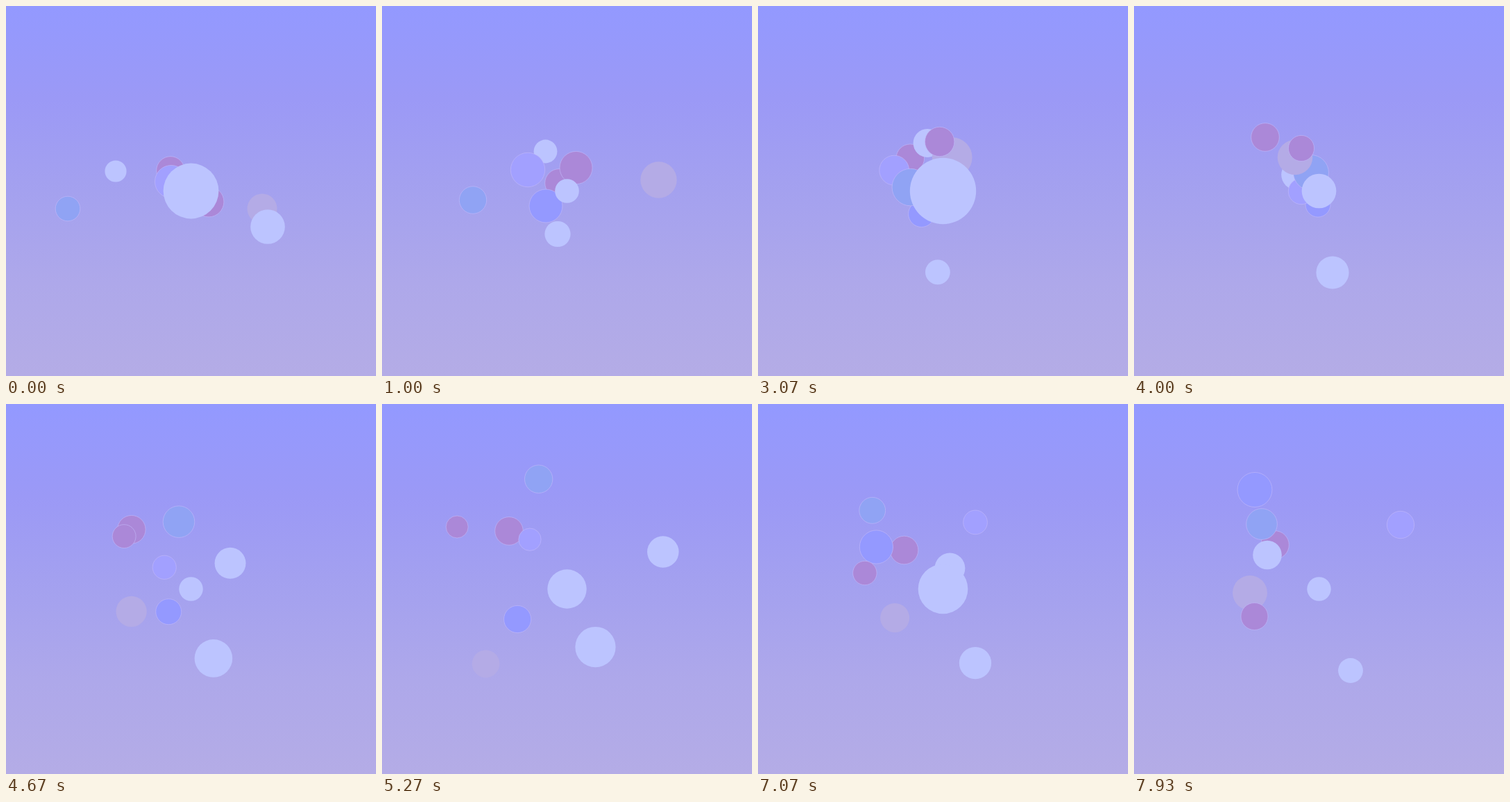
An HTML page with a canvas for the animation above (8000 ms loop, 533x533 px).

```html
<!DOCTYPE html>
<html lang="en">
<head>
<meta charset="utf-8">
<title>Drifting circles</title>
<style>
  html, body { margin: 0; width: 100%; height: 100%; overflow: hidden; background: #a3a0f0; }
  canvas { display: block; width: 100vw; height: 100vh; }
</style>
</head>
<body>
<canvas width="533" height="533"></canvas>
<script>
const SIZE = 533, LOOP = 8, RATE = 15;
const PALE = '#bcc4ff', ROSE = '#ab88d8', RIM = 'rgba(196,186,250,0.6)';
const ctx = document.querySelector('canvas').getContext('2d');

const backdrop = ctx.createLinearGradient(0, 0, 0, SIZE);
['#9399ff', '#9b99f6', '#a4a1ef', '#aea8ea', '#b4ace6']
  .forEach((color, i, all) => backdrop.addColorStop(i / (all.length - 1), color));

// A value swinging around mid, highest at the time peak.
const wave = (mid, swing, peak, period) => t =>
  mid + swing * Math.cos(2 * Math.PI * (t - peak) / period);

// Seconds at which every circle passes its next waypoint.
const beats = [0, 1, 2.13, 4, 5.27, 6.2, 7.93];

// A smooth curve through one value per beat.
function drift(...values) {
  const last = beats.length - 1;
  const slope = k => {
    const before = Math.max(0, k - 1), after = Math.min(last, k + 1);
    return (values[after] - values[before]) / (beats[after] - beats[before]);
  };
  return t => {
    const next = beats.findIndex(beat => beat > t);
    const b = next < 0 ? last : next, a = b - 1;
    const span = beats[b] - beats[a];
    const u = Math.min(1, (t - beats[a]) / span), v = 1 - u;
    return (1 + 2 * u) * v * v * values[a] + (1 + 2 * v) * u * u * values[b] +
      span * u * v * (v * slope(a) - u * slope(b));
  };
}

const still = value => () => value;
const diagonal = drift(237, 255, 250, 189, 183, 212.5, 203);

// Back to front.
const circles = [
  { color: ROSE, rim: true, x: diagonal, y: diagonal, radius: still(20.3) },
  { color: PALE,
    x: drift(158, 235.5, 274, 234, 405, 355, 192),
    y: drift(238, 209.5, 155, 243, 213, 247.5, 217.5),
    radius: wave(18.8, 4, 5.6, 14) },
  { color: '#9499ff', rim: true,
    x: drift(268, 236, 200.5, 265, 195, 171, 174),
    y: drift(268, 288, 313, 286, 310, 280, 123.5),
    radius: wave(21.5, 3.5, 8, 8) },
  { color: '#a2a0ff', rim: true,
    x: drift(238, 210, 155, 241, 213, 248, 384),
    y: drift(253, 236, 200.5, 267, 195, 171, 174),
    radius: wave(20.3, 4.4, 1.1, 9.4) },
  { color: '#90a3f4', rim: true,
    x: drift(89, 131, 173, 255, 225.5, 158.5, 184),
    y: drift(292, 279.5, 265, 240, 108, 133, 173),
    radius: wave(22.3, 4.5, 3.2, 6.3) },
  { color: '#b4abe6',
    x: drift(369, 398.5, 327, 232, 149.5, 213, 167),
    y: drift(292, 250.5, 243, 218, 374.5, 343, 272),
    radius: wave(24.3, 5.5, 2.4, 7.2) },
  { color: ROSE, rim: true,
    x: drift(292, 279.5, 265, 241, 108, 133.5, 173.5),
    y: drift(282, 233, 188.5, 205, 177, 189, 306),
    radius: wave(19.7, 4, 1.4, 8.8) },
  { color: PALE,
    x: drift(377, 253, 237, 286, 307.5, 313, 312),
    y: drift(318, 328.5, 371, 384, 350, 362, 384),
    radius: wave(22.3, 7, 5.5, 6.8) },
  { color: PALE, x: still(SIZE / 2), y: still(SIZE / 2), radius: wave(33, 16, 2.84, 3.46) },
];

function disc(x, y, radius, color, rim) {
  ctx.beginPath();
  ctx.arc(x, y, radius, 0, 2 * Math.PI);
  ctx.fillStyle = color;
  ctx.fill();
  if (rim) {
    ctx.strokeStyle = RIM;
    ctx.stroke();
  }
}

function draw() {
  const now = performance.now() / 1000 % LOOP;
  const t = Math.floor(now * RATE + 0.1) / RATE;
  ctx.fillStyle = backdrop;
  ctx.fillRect(0, 0, SIZE, SIZE);
  for (const { color, rim, x, y, radius } of circles) disc(x(t), y(t), radius(t), color, rim);
  requestAnimationFrame(draw);
}
draw();
</script>
</body>
</html>
```
